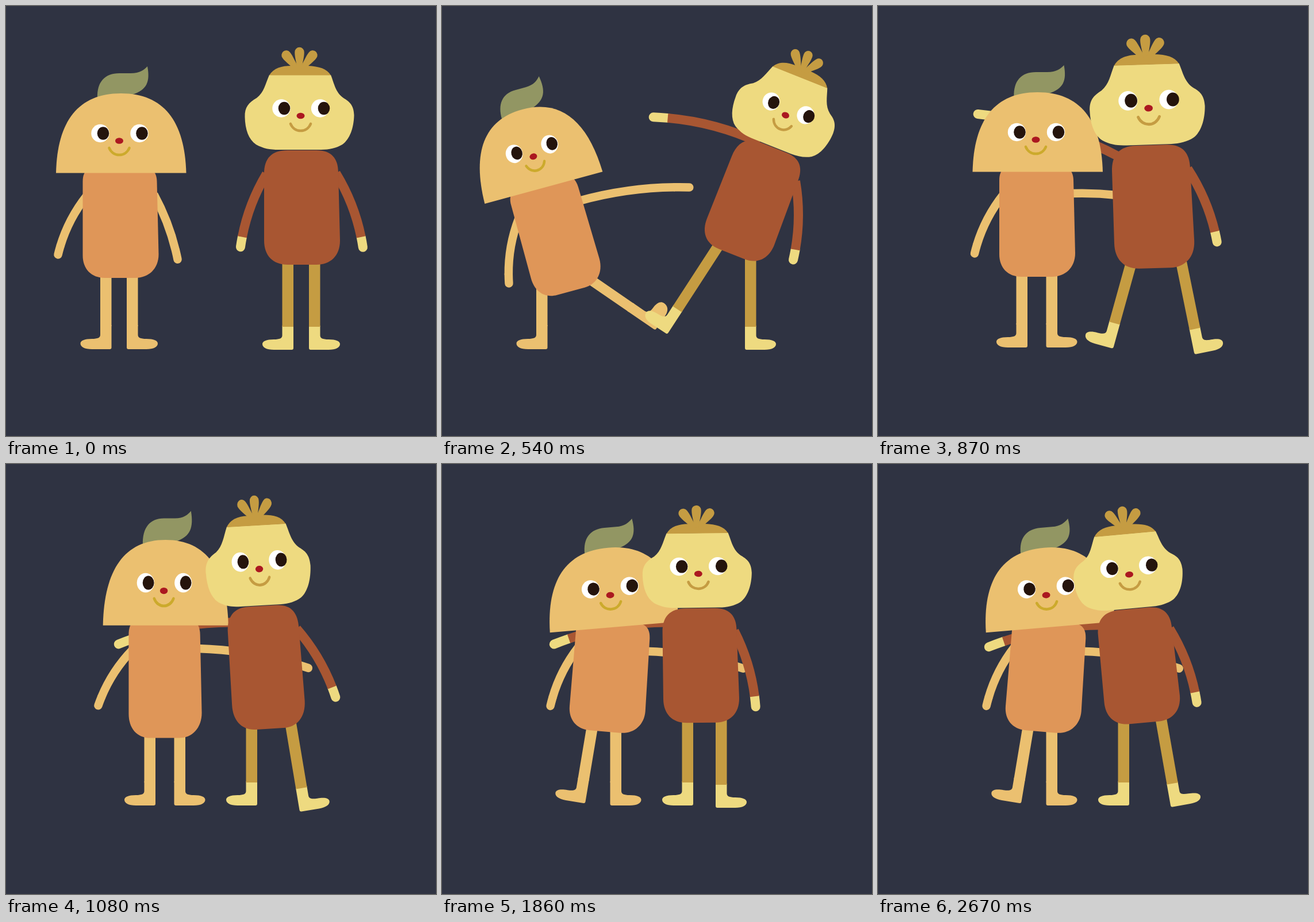
Write an HTML page with a canvas that moves like this. It is 748 px wide and 748 px high and loops after 2700 ms.

```html
<!DOCTYPE html>
<html lang="en">
<head>
<meta charset="utf-8">
<title>Two friends</title>
<style>
  html, body { margin: 0; height: 100%; overflow: hidden; background: #2f3342; }
  canvas { display: block; width: 100vw; height: 100vh; }
</style>
</head>
<body>
<canvas id="stage" width="748" height="748"></canvas>
<script>
const ctx = document.getElementById('stage').getContext('2d');
const LOOP = 2700, STEP = 30, RAD = Math.PI / 180;
const path = d => new Path2D(d);

const FOOT = path('M0-3Q0 0-3 0H-34C-47 0-54-4-54-10C-54-15-47-18-34-18C-24-18-19.5-20-19.5-25V-42H0Z');
const PETAL = path('M-4 4C-5-8-8.5-17-8.2-26A8.2 8.2 0 0 1 8.2-26C8.5-17 5-8 4 4Z');

// Each phase runs once from 0 to 1.
function phasesAt(t) {
  const go = (from, to) => {
    const u = Math.min(1, Math.max(0, (t - from) / (to - from)));
    return u * u * (3 - 2 * u);
  };
  const land = go(870, 1080);
  return {
    reach: go(0, 300), lunge: go(300, 540),
    recoil: go(130, 540), swing: go(250, 540),
    hop: go(540, 870), land, settle: go(1080, 1500),
    nestle: go(1350, 1680), lean: go(1860, 2130),
    stretch: land - 1.5 * go(1080, 1200) + .5 * go(1200, 1400),
    fling: go(870, 1200) - go(1200, 1500)
  };
}

// Arms hang at an angle from straight down, outwards; legs stand on their heel.
const mango = {
  base: { x: 199.5, y: 473 }, neck: { x: 200, y: 290 },
  skin: '#ebc070', sleeve: '#ebc070', trousers: '#ebc070', shirt: '#df9658',
  armWidth: 14.5, bends: [.11, .075],
  body: path('M133.5 305C133.5 285 145 280 160 280H237C255 280 262 290 262.5 305L265.5 432C265.5 457 248 473 225 473H172C148 473 133.5 457 133.5 434Z'),
  head() {
    fill('#929663', path('M159 160C158 132 172 117 197 117H217C233 117 240 111 246 105C251 132 245 146 220 154L190 165Z'));
    fill(this.skin, path('M87 290.5C89 200 126 152 200 152S311 200 313.5 290.5Z'));
    face(197, 221.5, [164, 232], [169, 236.5], 234.5, 247, '#ccaa2c');
  },
  pose({ reach, lunge, hop, land, nestle, stretch, fling }) {
    const kick = reach - hop, tilt = -15.2 * kick + 4.8 * nestle;
    return {
      x: 199.5 + 7.5 * reach + 18 * lunge + 52 * hop + 7.5 * nestle,
      y: 473 + 23 * reach - 25 * hop + 5.5 * stretch - 5.5 * nestle,
      tilt, nod: -9.7 * nestle,
      sx: 1 - .1 * kick + .038 * (lunge - hop) - .037 * stretch,
      sy: 1 + .02 * kick + .073 * stretch,
      arms: [
        { x: 140.5, y: 330, angle: 26 + 1.15 * tilt + 8 * fling - 6 * nestle, length: 114 },
        { x: 257.5, y: 328, angle: 20 + 75 * reach + 2 * lunge - 13.5 * hop - 3.5 * land,
          length: 120 + 61 * reach + 12 * lunge - 27 * hop + 30 * land - 24 * nestle }],
      legs: [
        { x: 183.5 + 76.5 * hop - 11 * nestle, y: 597 - 3 * hop - 8 * Math.sin(Math.PI * hop) - 3.5 * nestle,
          tilt: 9.5 * nestle, stretch: 1 },
        { x: 210 + 170 * reach - 9 * lunge - 78.5 * hop, y: 597 - 41 * reach + 8 * lunge + 30 * hop,
          tilt: -60.4 * reach + 4.9 * lunge + 55.5 * hop, stretch: 1 + .4 * kick }]
    };
  }
};

const onion = {
  base: { x: 515, y: 450 }, neck: { x: 511, y: 250 },
  skin: '#eeda80', sleeve: '#a85632', trousers: '#c59c42', shirt: '#a85632',
  armWidth: 16, bends: [.1, .1],
  body: path('M449 292C449 265 462 251 490 251H540C566 251 578 265 578 290L581 408C581 435 564 450 540 450H490C464 450 449 434 449 408Z'),
  head() {
    const hair = this.trousers;
    fill(this.skin, path('M458 120C451 136 449 150 436 160C422 168 415 176 415.5 193C416 215 422 232 435 241C448 248 458 250 475 250H548C562 250 575 247 585 241C598 232 605 212 605.5 190C605 172 597 166 587 160C573 150 571 135 565 120Z'));
    fill(hair, path('M458 120.5C465 108 480 104 496 104H525C545 105 558 109 565 120.5Z'));
    for (const side of [-1, 0, 1])
      within(510.5 + 7 * side, 106, 38 * side, 1, 1, () => fill(hair, PETAL));
    face(512.5, 178, [479, 546.5], [484, 553], 191, 205, hair);
  },
  pose({ recoil, swing, hop, land, settle, lean, stretch, fling }) {
    const tilt = 21.7 * recoil - 23.5 * hop - 1.5 * land + 2.6 * settle - 4.5 * lean;
    const grow = hop - land, kick = swing - hop;
    return {
      x: 515 - 11 * swing - 22 * hop - 23 * land - 7.5 * settle + 11.5 * lean,
      y: 450 - 10 * recoil - 8.5 * swing + 24.5 * hop + 4.5 * land - 10.5 * settle,
      tilt, nod: 0,
      sx: 1 - .047 * kick + .055 * grow - .04 * stretch,
      sy: 1 + .075 * (grow + stretch),
      arms: [
        { x: 453 + 34 * recoil - 22 * hop, y: 292 - 40 * recoil + 18 * hop + 5 * land,
          angle: 19.5 + 64 * recoil + 20 * swing + 3.5 * hop - 27.5 * land,
          length: 135 + 55 * swing + 71 * hop - 53 * land },
        { x: 574, y: 291, angle: 20 - tilt + 9 * fling - 5 * settle, length: 137 }],
      legs: [
        { x: 500 - 108 * swing + 17 * hop + 28 * land, y: 598 - 27 * swing + 25 * hop - 2 * land,
          tilt: 33 * swing - 17.5 * hop - 15.5 * land, stretch: 1 + .15 * kick + .08 * grow },
        { x: 527 + 23.5 * hop - 39.5 * land - 35 * settle + 33.5 * lean, y: 598 + 8 * hop - land - 7 * settle - lean,
          tilt: -11.5 * hop + 2 * land + 9.5 * settle - 10 * lean, stretch: 1 + .08 * grow }]
    };
  }
};

function fill(color, shape) {
  ctx.fillStyle = color;
  ctx.fill(shape);
}

function within(x, y, tilt, sx, sy, draw) {
  ctx.save();
  ctx.translate(x, y);
  ctx.rotate(tilt * RAD);
  ctx.scale(sx, sy);
  draw();
  ctx.restore();
}

function oval(color, x, y, rx, ry) {
  ctx.fillStyle = color;
  ctx.beginPath();
  ctx.ellipse(x, y, rx, ry, 0, 0, 7);
  ctx.fill();
}

function face(x, eyeY, eyes, pupils, noseY, mouthY, lip) {
  eyes.forEach(ex => oval('#fff', ex, eyeY, 15.7, 15.7));
  pupils.forEach(px => oval('#25140c', px, eyeY, 10.3, 11.2));
  oval('#ab1820', x, noseY, 7, 5.3);
  ctx.strokeStyle = lip;
  ctx.lineWidth = 4.6;
  ctx.lineCap = 'round';
  ctx.beginPath();
  ctx.moveTo(x - 17.5, mouthY);
  ctx.bezierCurveTo(x - 11, mouthY + 16, x + 11, mouthY + 16, x + 17.5, mouthY);
  ctx.stroke();
}

const mix = (a, b, u) => a.map((v, i) => v + (b[i] - v) * u);

function curve(from, control, to, color, cap) {
  ctx.strokeStyle = color;
  ctx.lineCap = cap;
  ctx.beginPath();
  ctx.moveTo(...from);
  ctx.quadraticCurveTo(...control, ...to);
  ctx.stroke();
}

function arm(who, pose, side) {
  const { x, y, angle, length } = pose.arms[side], out = side ? 1 : -1;
  const px = (x - who.base.x) * pose.sx, py = (y - who.base.y) * pose.sy;
  const cos = Math.cos(pose.tilt * RAD), sin = Math.sin(pose.tilt * RAD);
  const start = [pose.x + px * cos - py * sin, pose.y + px * sin + py * cos];
  const dx = out * length * Math.sin(angle * RAD), dy = length * Math.cos(angle * RAD);
  const end = [start[0] + dx, start[1] + dy], bend = out * who.bends[side];
  const control = [start[0] + dx / 2 + dy * bend, start[1] + dy / 2 - dx * bend];
  const cut = .87, near = mix(start, control, cut), far = mix(control, end, cut), wrist = mix(near, far, cut);
  ctx.lineWidth = who.armWidth;
  curve(wrist, far, end, who.skin, 'round');
  curve(start, near, wrist, who.sleeve, 'butt');
}

function leg(who, pose, side) {
  const { x, y, tilt, stretch } = pose.legs[side], length = 185 / stretch;
  const thin = 1.3 - .3 * stretch;
  within(x, y, tilt, side ? -thin : thin, stretch, () => {
    fill(who.skin, FOOT);
    ctx.fillStyle = who.trousers;
    ctx.fillRect(-19.5, -length, 19.5, length - 40);
  });
}

function upper(who, { x, y, tilt, sx, sy, nod }) {
  within(x, y, tilt, sx, sy, () => {
    ctx.translate(-who.base.x, -who.base.y);
    fill(who.shirt, who.body);
    within(who.neck.x, who.neck.y, nod, 1, 1, () => {
      ctx.translate(-who.neck.x, -who.neck.y);
      who.head();
    });
  });
}

function frame(now) {
  const phases = phasesAt(Math.floor(now % LOOP / STEP) * STEP);
  const left = mango.pose(phases), right = onion.pose(phases);
  ctx.fillStyle = '#2f3342';
  ctx.fillRect(0, 0, 748, 748);
  arm(onion, right, 0);
  for (const side of [0, 1]) arm(mango, left, side);
  for (const side of [0, 1]) leg(mango, left, side);
  upper(mango, left);
  arm(onion, right, 1);
  for (const side of [0, 1]) leg(onion, right, side);
  upper(onion, right);
  requestAnimationFrame(frame);
}
requestAnimationFrame(frame);
</script>
</body>
</html>
```
